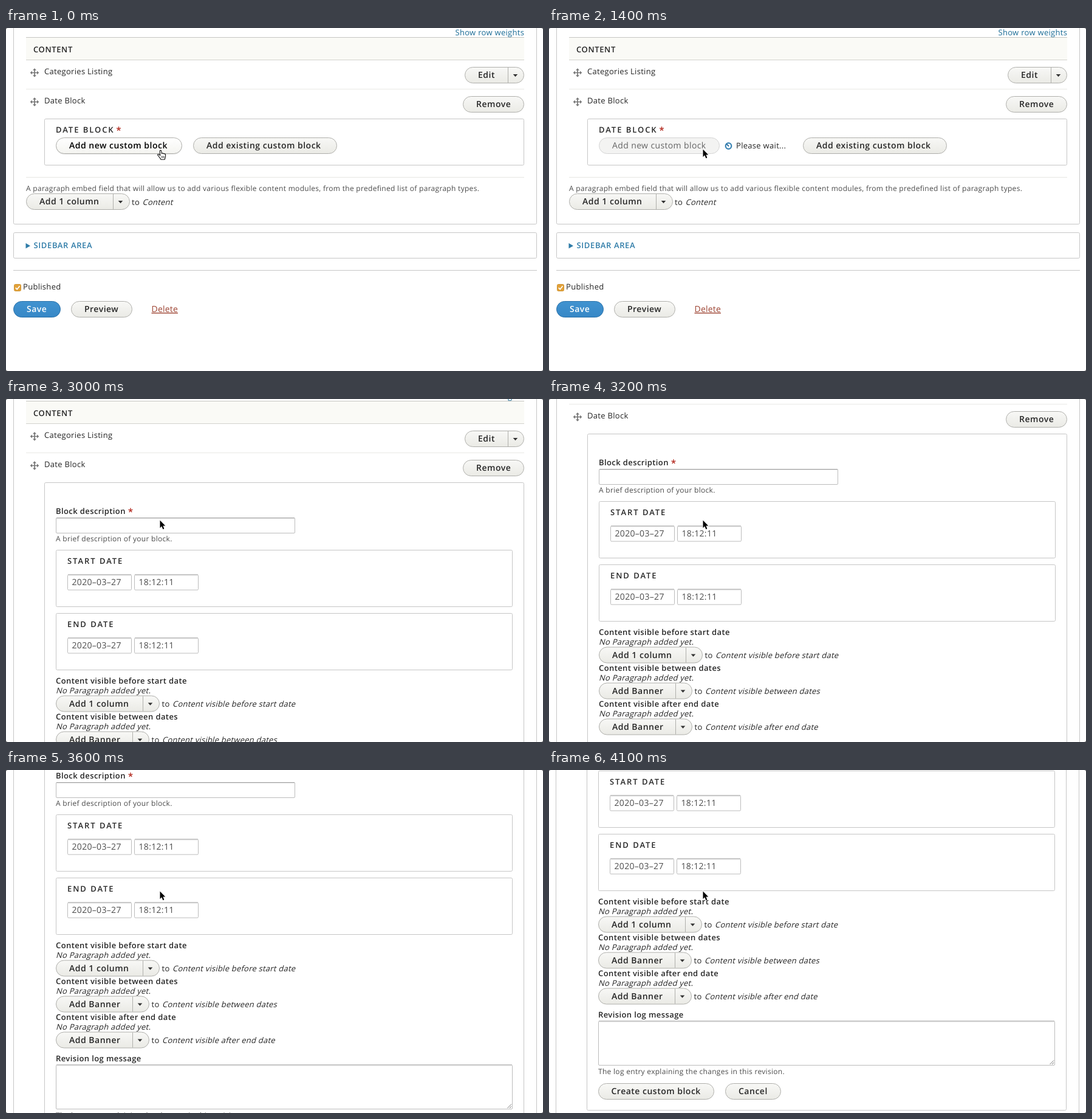
An HTML page that plays this animation: 884x564 px, repeating every 4200 ms.

```html
<!DOCTYPE html>
<html lang="en">
<head>
<meta charset="utf-8">
<title>Date block form</title>
<style>
  html, body { margin: 0; width: 100%; height: 100%; overflow: hidden; background: #fff; }
  svg { display: block; width: 884px; height: 564px; }
  text { font: 13px "Open Sans", "Noto Sans", sans-serif; letter-spacing: .3px; fill: #262626; white-space: pre; text-rendering: geometricPrecision; }
  .small { font-size: 12px; letter-spacing: .295px; fill: #4c4c4c; }
  .bold { font-weight: 600; letter-spacing: .4px; }
  .head { font-weight: 600; letter-spacing: .62px; }
  .legend { font-weight: 600; letter-spacing: 1.95px; }
  .btn { font-size: 14px; font-weight: 600; letter-spacing: .5px; }
  .off { font-size: 14px; letter-spacing: .38px; fill: #646464; }
  .value { font-size: 14px; letter-spacing: .32px; fill: #4c4c4c; }
  .slant { letter-spacing: .23px; }
  .link { fill: #1b6c96; }
  .side { fill: #2f7ca8; }
  .hot { fill: #000; }
  .white { fill: #fff; }
  .delete { font-size: 14px; letter-spacing: .2px; fill: #9e4534; text-decoration: underline; }
</style>
</head>
<body>
<svg id="stage" viewBox="0 0 884 564">
  <defs>
    <linearGradient id="plain" x2="0" y2="1"><stop stop-color="#f8f8f6"/><stop offset="1" stop-color="#eaeae5"/></linearGradient>
    <linearGradient id="hover" x2="0" y2="1"><stop stop-color="#fff"/><stop offset="1" stop-color="#f4f4f0"/></linearGradient>
    <linearGradient id="blue" x2="0" y2="1"><stop stop-color="#4193d0"/><stop offset="1" stop-color="#3687c6"/></linearGradient>
  </defs>
</svg>
<script>
const LOOP = 4200, STEP = 100;
const WAIT_AT = 700, FORM_AT = 2000, SCROLL_AT = 2900, NUDGE_AT = 4100;
const SCROLL = [3, 12, 45, 92, 130, 157, 174, 187, 198, 207, 222, 242, 259];

const stage = document.getElementById('stage');

function add(parent, tag, attrs, content) {
  const el = document.createElementNS('http://www.w3.org/2000/svg', tag);
  for (const key in attrs) el.setAttribute(key, attrs[key]);
  if (content) el.textContent = content;
  parent.append(el);
  return el;
}
const group = (parent) => add(parent, 'g', {});
const path = (g, d, attrs) => add(g, 'path', { d, ...attrs });
const label = (g, x, y, str, cls = '') => add(g, 'text', { x, y, class: cls }, str);
const slant = (g, x, y, str) =>
  add(g, 'text', { transform: `translate(${x} ${y}) skewX(-14)`, class: 'slant' }, str);
const line = (g, x1, x2, y, stroke) => path(g, `M${x1} ${y}H${x2}`, { stroke });

// Boxes are given by their outer edges; the 1px border lies inside.
function box(g, x1, y1, x2, y2, attrs) {
  return add(g, 'rect', {
    x: x1 + .5, y: y1 + .5, width: x2 - x1 - 1, height: y2 - y1 - 1,
    rx: 2, fill: '#fff', stroke: '#c6c6c6', ...attrs
  });
}

function button(g, x1, x2, y, str, { fill = 'url(#plain)', stroke = '#afafab', cls = 'btn', pad = 22, split } = {}) {
  box(g, x1, y, x2, y + 27, { rx: 13, fill, stroke });
  label(g, x1 + pad, y + 18, str, cls);
  if (split) {
    path(g, `M${split + .5} ${y + 1}v25`, { stroke: '#afafab' });
    path(g, `M${split + 8.7} ${y + 12}h7.6l-3.8 4.2z`, { fill: '#333' });
  }
}

function field(g, x1, y1, x2, y2, str) {
  box(g, x1, y1, x2, y2, { stroke: '#bcbcbc', rx: 1.5 });
  line(g, x1 + 1, x2 - 1, y1 + .5, '#a0a0a0');
  line(g, x1 + 1, x2 - 1, y1 + 1.5, '#e3e3e3');
  if (str) label(g, x1 + 7.5, y1 + 17.5, str, 'value');
}

function star(g, x, y) {
  for (let i = 0; i < 5; i++) {
    path(g, 'M0 0V-3.7', { transform: `translate(${x} ${y}) rotate(${i * 72})`, stroke: '#b93a30', 'stroke-width': 1.5 });
  }
}

function dragIcon(g, x, y) {
  const icon = add(g, 'g', { transform: `translate(${x} ${y})`, fill: '#777' });
  path(icon, 'M-5 0H5M0-5V5', { stroke: '#777', 'stroke-width': 1.7 });
  for (let a = 0; a < 360; a += 90) path(icon, 'M-3-4L0-7.3L3-4z', { transform: `rotate(${a})` });
}

const page = group(stage);

// Lower page, before the form opens
const closed = group(page);
box(closed, 12, -20, 874, 323);
box(closed, 63, 149, 853, 226);
label(closed, 82, 172, 'DATE BLOCK', 'legend');
star(closed, 185.5, 165.8);
line(closed, 33, 853, 245.5, '#e6e6e2');
label(closed, 33, 267.8, 'A paragraph embed field that will allow us to add various flexible content modules, from the predefined list of paragraph types.', 'small');
button(closed, 33, 204, 272, 'Add 1 column', { split: 176 });
label(closed, 207, 290.5, 'to');
slant(closed, 224.5, 290.5, 'Content');
box(closed, 12, 336, 874, 379);
path(closed, 'M32.5 353.8L40 358.2L32.5 362.6z', { fill: '#2f7ca8' });
label(closed, 45.5, 362, 'SIDEBAR AREA', 'head side');
line(closed, 12, 874, 398.5, '#c6c6c6');
box(closed, 13, 421, 25, 433, { fill: '#e2a138', stroke: '#cf9434' });
path(closed, 'M15.8 427.2l2.4 2.6 4.3-5.6', { fill: 'none', stroke: '#fff', 'stroke-width': 1.7 });
label(closed, 28, 430, 'Published');
button(closed, 12, 90, 449, 'Save', { fill: 'url(#blue)', stroke: '#2b72aa', cls: 'btn white' });
button(closed, 107, 208, 449, 'Preview');
label(closed, 239.5, 467, 'Delete', 'delete');

const idle = group(closed);
box(idle, 82, 181, 290, 208, { rx: 13, fill: '#e6e6e6', stroke: '#e6e6e6' });
button(idle, 82, 290, 180, 'Add new custom block', { fill: 'url(#hover)', cls: 'btn hot' });
button(idle, 308, 545, 180, 'Add existing custom block');

const wait = group(closed);
button(wait, 82, 281, 180, 'Add new custom block', { fill: '#f3f3f2', stroke: '#d4d4d4', cls: 'off' });
const throbber = group(wait);
add(throbber, 'circle', { r: 4.8, fill: '#fff', stroke: '#3a84b4', 'stroke-width': 2.2 });
path(throbber, 'M.5 .5L-3.4-3.4', { stroke: '#2a6f9f', 'stroke-width': 1.8 });
label(wait, 308, 198, 'Please wait...');
button(wait, 418, 655, 180, 'Add existing custom block');

// Opened form
const form = group(page);
box(form, 12, -20, 874, 900);
box(form, 63, 149, 853, 819);
label(form, 82, 201.3, 'Block description', 'bold');
star(form, 205, 195);
field(form, 82, 207, 476, 233);
label(form, 82, 245.5, 'A brief description of your block.', 'small');
['START DATE', 'END DATE'].forEach((title, i) => {
  const y = 260 + i * 104;
  box(form, 82, y, 834, y + 94);
  label(form, 101, y + 23, title, 'legend');
  field(form, 101, y + 40.5, 207, y + 66.5, '2020–03–27');
  field(form, 211, y + 40.5, 317, y + 66.5, '18:12:11');
});
[
  ['before start date', 'Add 1 column', 253],
  ['between dates', 'Add Banner', 236],
  ['after end date', 'Add Banner', 236]
].forEach(([when, action, right], i) => {
  const y = 479.5 + i * 59;
  label(form, 82, y, 'Content visible ' + when, 'bold');
  slant(form, 82, y + 16, 'No Paragraph added yet.');
  button(form, 82, right, y + 20, action, { split: right - 28 });
  label(form, right + 3.5, y + 38, 'to');
  slant(form, right + 21, y + 38, 'Content visible ' + when);
});
label(form, 82, 666.3, 'Revision log message', 'bold');
field(form, 82, 671.5, 834, 745);
path(form, 'M825.5 743l6.5-6.5M829 743l3-3', { stroke: '#777' });
label(form, 82, 759.2, 'The log entry explaining the changes in this revision.', 'small');
button(form, 82, 273, 774, 'Create custom block', { pad: 21.5 });
button(form, 291, 383, 774, 'Cancel');

// Table rows shared by both views
label(page, 739.5, 12, 'Show row weights', 'link');
add(page, 'rect', { x: 33, y: 16, width: 820, height: 37, fill: '#fafaf6' });
line(page, 33, 853, 15.5, '#c6c6c2');
line(page, 33, 853, 52.5, '#d2d2cd');
label(page, 45, 39.5, 'CONTENT', 'head');
dragIcon(page, 47, 73.5);
label(page, 63, 76.2, 'Categories Listing');
button(page, 755, 853, 64, 'Edit', { split: 826 });
line(page, 33, 853, 100.5, '#e9e9e6');
dragIcon(page, 47, 121.5);
label(page, 63, 124.2, 'Date Block');
button(page, 752, 853, 112, 'Remove');

// Pointers
const hand = add(stage, 'g', { transform: 'translate(0 .7)' });
path(hand, 'M253.2 201.8c0-1.9 2.4-1.9 2.6 0l.5 4c.3-1.2 2.2-1 2.3.3c.5-.9 2-.6 2.1.5c.6-.7 1.9-.3 1.9.9v2.6c0 2-1 3-1.3 5.5h-6.3c-.4-1.8-2.2-3.2-3.3-4.8l-1.8-2.3c-.7-1.4.9-2.2 1.9-1.3l2 1.8z',
  { fill: '#fff', stroke: '#111', 'stroke-width': 1.1, 'stroke-linejoin': 'round' });
path(hand, 'M256.3 209.8v3.2M258.2 209.8v3.2M260.1 209.8v3.2', { stroke: '#111', 'stroke-width': .8 });
const arrow = path(stage, 'M253.5 199.5v12.4l2.8-2.6 2.1 4.9 2-.9-2-4.7h3.9z',
  { fill: '#000', stroke: '#fff', 'stroke-width': 1.6, 'paint-order': 'stroke' });

// Rounded window corners
path(stage, 'M0 0H3Q0 0 0 3zM884 0v3Q884 0 881 0zM0 564v-3Q0 564 3 564zM884 564h-3Q884 564 884 561z', { fill: '#555' });

const show = (el, on) => el.setAttribute('visibility', on ? 'visible' : 'hidden');

function draw(now) {
  const t = Math.floor(now % LOOP / STEP) * STEP;
  const open = t >= FORM_AT, waiting = t >= WAIT_AT;
  const top = t < SCROLL_AT ? 0 : SCROLL[(t - SCROLL_AT) / STEP];
  show(closed, !open);
  show(form, open);
  show(idle, !waiting && !open);
  show(wait, waiting && !open);
  show(hand, !waiting);
  show(arrow, waiting);
  page.setAttribute('transform', `translate(${t >= NUDGE_AT ? -1 : 0} ${-top})`);
  throbber.setAttribute('transform', `translate(295.5 194) rotate(${(t - 1400) / STEP * 45})`);
}

function tick() {
  draw(performance.now());
  requestAnimationFrame(tick);
}
tick();
</script>
</body>
</html>
```
